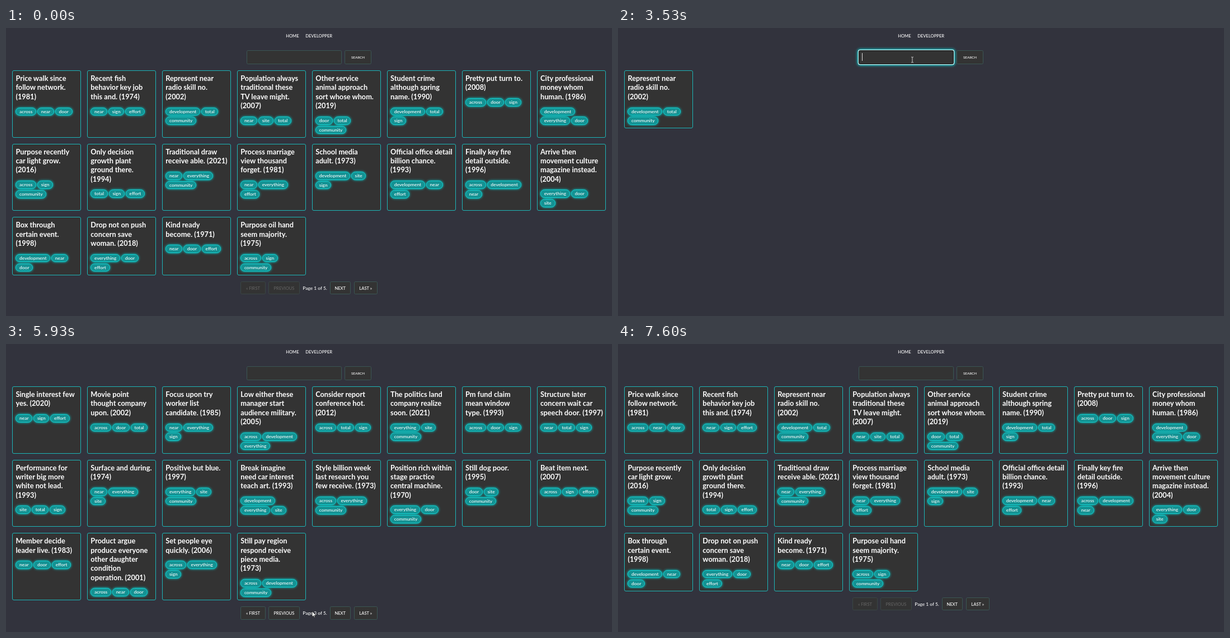
These frames come from a looping animation (1083x517 px, 8.34 s). An HTML page:

```html
<!DOCTYPE html>
<html lang="en">
<head>
<meta charset="utf-8">
<title>Card search</title>
<style>
* { box-sizing: border-box; }
html, body { margin: 0; width: 100%; height: 100%; overflow: hidden; background: #32333d; }
body { position: relative; color: #fff; font-family: Lato, sans-serif; font-size: var(--body); font-weight: 500; }
nav span, .box, .pager, .pager > *, .grid, #cursor { position: absolute; }
nav span { top: 8.4px; line-height: 12px; font-size: var(--caps); white-space: nowrap; }

.box { top: 39.5px; height: 25.5px; border: 1px solid #3b5654; border-radius: 2.5px; background: #333; display: flex; align-items: center; }
#field { left: 430px; width: 170px; padding-left: 5.4px; font-size: var(--input); }
#field.focus { border-color: #111; box-shadow: 0 0 0 1.2px #c4f3f3, 0 0 5px 1.5px #0ff; }
#value { line-height: 15px; }
#value.selected { background: #3297fd; }
#caret { width: 1px; height: 14px; background: #ddd; }
#search { left: 605px; width: 48px; justify-content: center; font-size: var(--small); }

.grid { left: 11.25px; top: 76.2px; display: grid; grid-template-columns: repeat(8, 122.7px); gap: 11.25px; visibility: hidden; }
.card { padding: 5.17px; border: 1px solid #1db6b8; border-radius: 3px; background: #333; white-space: nowrap; }
h2 { margin: 0 0 11.25px; font-size: var(--head); font-weight: 700; line-height: 16.31px; }
h2 span { position: relative; top: -.2px; }
.row { display: flex; gap: 2px; height: 14.7px; }
.row + .row { margin-top: 2.2px; }
.chip { height: 14.7px; padding: 0 5.7px; border: 1px solid #14d0d0; border-radius: 7.4px; background: #149293; box-shadow: 0 0 4px #00dede; line-height: 12.7px; }

.pager { left: 0; }
.btn { height: 23.5px; border: 1px solid #3b5654; border-radius: 2.5px; background: #333; font-size: var(--caps); display: flex; align-items: center; justify-content: center; white-space: nowrap; }
.btn::before { content: ""; position: absolute; inset: -1px; border: 1px solid #1fd0d0; border-radius: 2.5px; background: #2b5a5d; box-shadow: 0 0 5px 1px #0dd; opacity: var(--hover, 0); }
.btn span { position: relative; }
.btn.off { color: #626262; border-color: #3a4645; }
#count { left: 530.3px; top: 5.8px; line-height: 12px; white-space: nowrap; }

#cursor { left: 0; top: 0; overflow: visible; }
#cursor path { fill: #fff; stroke: #000; stroke-width: .6; visibility: hidden; }
#cursor .beam { fill: none; stroke: #ddd; stroke-width: .9; }
</style>
</head>
<body>
<nav><span style="left:500.2px">HOME</span><span style="left:535.2px">DEVELOPPER</span></nav>
<div class="box" id="field"><span id="value"></span><i id="caret"></i></div>
<div class="box" id="search">SEARCH</div>
<main id="pages"></main>
<div class="pager" id="pager"><span id="count"></span></div>
<svg id="cursor" width="1" height="1">
  <path class="arrow" d="M0 0V10L2.3 7.9L3.9 11.3L5.3 10.7L3.8 7.4H6.9Z"/>
  <path class="hand" d="M-1-.2Q.2-1.6 1.4-.2V4L5 5Q6.2 5.5 6.1 7L5.2 12.5H-.3L-3.4 8.2Q-3.7 6.6-2.2 6.8L-1 7.9Z"/>
  <path class="beam" d="M-2-5Q0-5 0-4Q0-5 2-5M0-4V4M-2 5Q0 5 0 4Q0 5 2 5"/>
</svg>
<script>
const LOOP = 8340;
const $ = id => document.getElementById(id);

const TAGS = {
  a: 'across', d: 'door', n: 'near', s: 'site', t: 'total', g: 'sign',
  e: 'effort', v: 'everything', D: 'development', c: 'community'
};

// Each card: title lines split by |, then tag letters with / between rows.
const PAGES = [
`Price walk since|follow network.|(1981)~and
Recent fish|behavior key job|this and. (1974)~nge
Represent near|radio skill no.|(2002)~Dt/c
Population always|traditional these|TV leave might.|(2007)~nst
Other service|animal approach|sort whose whom.|(2019)~dt/c
Student crime|although spring|name. (1990)~Dt/g
Pretty put turn to.|(2008)~adg
City professional|money whom|human. (1986)~D/vd
Purpose recently|car light grow.|(2016)~ag/c
Only decision|growth plant|ground there.|(1994)~tge
Traditional draw|receive able. (2021)~nv/c
Process marriage|view thousand|forget. (1981)~nv/e
School media|adult. (1973)~Ds/g
Official office detail|billion chance.|(1993)~Dn/e
Finally key fire|detail outside.|(1996)~aD/n
Arrive then|movement culture|magazine instead.|(2004)~vd/s
Box through|certain event.|(1998)~Dn/d
Drop not on push|concern save|woman. (2018)~vd/e
Kind ready|become. (1971)~nde
Purpose oil hand|seem majority.|(1975)~ag/c`,
`Push experience|raise focus. (1972)~Ds/t
Various executive|lead concern|specific through|security. (2010)~dtg
Herself car say|claim large else.|(1986)~at/c
Yeah PM according|thus rock heavy.|(2000)~nv/t
Democratic music|show free rich tax.|(1986)~dg/c
Tree produce|speech although|town appear.|(1999)~nst
Term fine see|kitchen simple|future. (1992)~asg
Act without chair|quickly police.|(1977)~nv/t
Reflect father have|level think degree.|(2023)~av/c
Bar almost|modern. (1978)~vd/s
Though party glass|none ability. (1987)~vt/c
Option response|this serve yet|mission. (2018)~ste
House meet early|really worker.|(2003)~aD/d
Conference type|charge nothing do|others range force.|(2008)~D/vd
Eight fight yeah|different heart|interest past.|(1981)~D/ce
Discuss put give|take place heart.|(1998)~adt
Account everything|bill begin pattern.|(1978)~nsg
As mean life sound.|(2000)~adg
Know class hit|seem provide.|(2000)~D/vd
Father carry federal|professional white|policy community.|(1999)~Dn/s`,
`Single interest few|yes. (2020)~nge
Movie point|thought company|upon. (2002)~adt
Focus upon try|worker list|candidate. (1985)~nv/g
Low either these|manager start|audience military.|(2005)~aD/v
Consider report|conference hot.|(2012)~atg
The politics land|company realize|soon. (2021)~vs/c
Pm fund claim|mean window|type. (1993)~adg
Structure later|concern wait car|speech door. (1997)~ntg
Performance for|writer big more|white not lead.|(1993)~stg
Surface and during.|(1974)~nv/s
Positive but blue.|(1997)~vs/c
Break imagine|need car interest|teach art. (1993)~D/vs
Style billion week|last research you|few receive. (1973)~av/c
Position rich within|stage practice|central machine.|(1970)~vd/c
Still dog poor.|(1995)~ds/c
Beat item next.|(2007)~age
Member decide|leader live. (1983)~nde
Product argue|produce everyone|other daughter|condition|operation. (2001)~and
Set people eye|quickly. (2006)~av/g
Still pay region|respond receive|piece media.|(1973)~aD/c`
].map(text => text.split('\n'));
const RESULT = 3;
PAGES.push([PAGES[0][2]]);

const BUTTONS = [['« FIRST', 419, 45], ['PREVIOUS', 469, 56], ['NEXT', 578.5, 37.5], ['LAST »', 621.5, 42.5]];

// Value in force from each time on
const SHOWN = [[0, 0], [2670, RESULT], [3930, 0], [5270, 1], [5530, 2], [6670, 1], [7130, 0]];
const TYPED = [[0, ''], [1870, 're'], [2070, 'rep'], [2170, 'repr'], [2270, 'repre'], [3530, '']];
const FOCUS = [[0, 0], [930, 1], [2670, 0], [3200, 1], [3930, 0]];
const CARET = [[0, 0], [930, 1], [1470, 0], [1870, 1], [2670, 0], [3200, 1], [3270, 0], [3530, 1], [3930, 0]];
const SELECTED = [[0, 0], [3270, 1], [3530, 0]];
const HOVERS = [[2, 4900, 5270], [1, 6250, 6670], [1, 6950, 7130]];

// Pointer: time, x, y
const PATH = [
  [70, 1061, 508], [270, 905, 372], [470, 715, 207], [670, 583, 98], [870, 526, 57],
  [4130, 526, 57], [4280, 514, 130], [4430, 507, 255], [4580, 530, 390], [4730, 575, 476], [4930, 592, 475.5],
  [5560, 592, 475.5], [5800, 572, 478], [6100, 515, 482], [6330, 493, 481.5],
  [6870, 493, 481.5], [7000, 493, 470], [7140, 494, 470], [7350, 510, 492], [7600, 530, 524]
];

function fit(name, sample, width, weight = 500) {
  const ctx = fit.ctx ||= document.createElement('canvas').getContext('2d');
  ctx.font = `${weight} 100px Lato, sans-serif`;
  const size = 100 * width / ctx.measureText(sample).width;
  document.documentElement.style.setProperty(name, size.toFixed(2) + 'px');
}
fit('--head', 'Population alwaysreceive able. (2021)', 213.5, 700);
fit('--body', 'developmenteverythingcommunity', 129.2);
fit('--caps', 'HOMEDEVELOPPER', 71.4);
fit('--small', 'SEARCH', 24.2);
fit('--input', 'repre', 24);

const chip = key => `<div class="chip">${TAGS[key]}</div>`;
const row = keys => `<div class="row">${[...keys].map(chip).join('')}</div>`;
function card(line) {
  const [title, tags] = line.split('~');
  return `<div class="card"><h2><span>${title.replaceAll('|', '<br>')}</span></h2>${tags.split('/').map(row).join('')}</div>`;
}
$('pages').innerHTML = PAGES.map(p => `<section class="grid">${p.map(card).join('')}</section>`).join('');
const grids = [...document.querySelectorAll('.grid')];
const bottoms = grids.map(g => g.getBoundingClientRect().bottom);

const buttons = BUTTONS.map(([label, left, width]) => {
  const el = document.createElement('div');
  el.className = 'btn';
  el.style.left = left + 'px';
  el.style.width = width + 'px';
  el.innerHTML = `<span>${label}</span>`;
  $('pager').append(el);
  return el;
});
const shapes = [...document.querySelectorAll('#cursor path')];

const at = (list, t) => list.findLast(k => k[0] <= t)[1];

function pointer(t) {
  const i = PATH.findLastIndex(k => k[0] <= t);
  if (i < 0 || i === PATH.length - 1) return null;
  const [a, b] = [PATH[i], PATH[i + 1]];
  const k = (t - a[0]) / (b[0] - a[0]);
  return [a[1] + (b[1] - a[1]) * k, a[2] + (b[2] - a[2]) * k];
}

function shapeAt(x, y, page, top) {
  if (x > 430 && x < 600 && y > 39 && y < 65) return 'beam';
  const inRow = page !== RESULT && y >= top && y <= top + 23.5;
  const hit = BUTTONS.some(([, left, w], i) => (page > 0 || i > 1) && x >= left && x <= left + w);
  return inRow && hit ? 'hand' : 'arrow';
}

function draw(t) {
  const page = at(SHOWN, t);
  const top = bottoms[page] + 11.25;
  grids.forEach((g, i) => g.style.visibility = i === page ? 'visible' : 'hidden');

  $('value').textContent = at(TYPED, t);
  $('value').className = at(SELECTED, t) ? 'selected' : '';
  $('field').classList.toggle('focus', !!at(FOCUS, t));
  $('caret').style.visibility = at(CARET, t) ? 'visible' : 'hidden';

  $('pager').style.top = top + 'px';
  $('pager').style.display = page === RESULT ? 'none' : 'block';
  $('count').textContent = `Page ${page + 1} of 5.`;
  buttons.forEach((b, i) => {
    const h = HOVERS.find(([n, from, to]) => n === i && t >= from && t < to);
    b.style.setProperty('--hover', h ? Math.min(1, (t - h[1]) / 250) : 0);
    b.classList.toggle('off', page === 0 && i < 2);
  });

  const pos = pointer(t);
  const shape = pos && shapeAt(...pos, page, top);
  if (pos) $('cursor').style.transform = `translate(${pos[0]}px, ${pos[1]}px)`;
  shapes.forEach(s => s.style.visibility = s.classList.contains(shape) ? 'visible' : 'hidden');
}

const start = performance.now();
function tick() {
  draw((performance.now() - start) % LOOP);
  requestAnimationFrame(tick);
}
tick();
</script>
</body>
</html>
```
